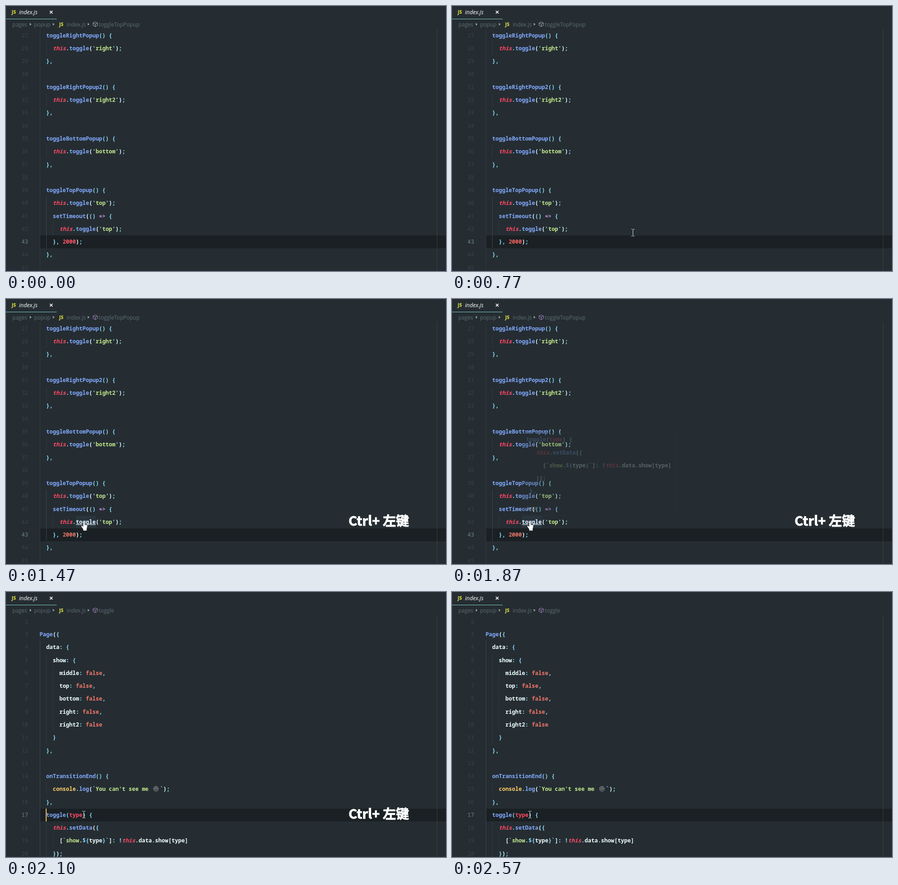
An HTML page that plays this animation: 964 by 581 pixels, repeating every 2880 ms.

```html
<!DOCTYPE html>
<html lang="en">
<head>
<meta charset="utf-8">
<title>Go to definition</title>
<style>
  html, body { margin: 0; width: 100%; height: 100%; overflow: hidden; background: #252d32; }
  svg { display: block; width: 964px; height: 581px; }
  text { white-space: pre; }
  .code { font: 600 12.06px "Noto Sans Mono", monospace; }
  .ui { font: 11.8px "Open Sans", sans-serif; fill: #5b6c73; }
  .js { font: 800 10px "Open Sans", sans-serif; fill: #cbcb41; }
  .tab { font: italic 500 12.3px "Open Sans", sans-serif; fill: #fff; }
  .keys { font: 900 28.8px "Noto Sans CJK SC", "Noto Sans CJK", sans-serif; fill: #fff; stroke: #fff; stroke-width: .9; }
  .num { fill: #374349; font-weight: 400; text-anchor: end; }
  .num.on { fill: #6c7f88; }
  .b { fill: #82aaff; }
  .c, .e { fill: #89ddff; }
  .g { fill: #c3e88d; }
  .n { fill: #f3776a; }
  .p { fill: #c792ea; }
  .r { fill: #ff4965; }
  .t { fill: #ff4965; font-style: italic; }
  .w { fill: #eeffff; }
  .y { fill: #ffcb6b; }
  .guide { fill: #2f3a3f; }
  .guide.on { fill: #3a464c; }
  .link { fill: #dce8ec; text-decoration: underline; }
</style>
</head>
<body>
<svg viewBox="0 0 964 581">
  <rect width="964" height="581" fill="#252d32"/>

  <text class="js" x="12.500" y="17">JS</text>
  <text class="tab" x="28.5" y="18">index.js</text>
  <path d="M96 10.500l6 6m0-6l-6 6" stroke="#fff" stroke-width="1.7"/>
  <rect y="28" width="111" height="1" fill="#80cbc4"/>

  <g class="ui">
    <text x="14" y="44.5">pages</text>
    <text x="61.5" y="44.5">popup</text>
    <text x="133" y="44.5">index.js</text>
    <text x="203" y="44.5" data-show="0-2100">toggleTopPopup</text>
    <text x="203" y="44.5" data-show="2100-2880">toggle</text>
  </g>
  <text class="js" x="116.500" y="43.5">JS</text>
  <path d="M52 37l4 3-4 3zM102.500 37l4 3-4 3zM179 37l4 3-4 3z" fill="#91a0a6"/>
  <path id="cube" d="M195.500 35l4.800 2.300v5.200l-4.800 2.800-4.800-2.800v-5.200zM190.700 37.300l4.800 2.400 4.800-2.400M195.500 39.700v5.600" fill="none"/>

  <g id="before" class="code" data-show="0-2100"></g>
  <g id="after" class="code" data-show="2100-2880"></g>
  <rect x="944" y="50" width="1" height="531" fill="#364146"/>

  <g id="link" class="code" data-show="1400-2100"></g>
  <g id="hover" class="code" data-show="1870-2020">
    <rect x="154.500" y="291.500" width="336" height="182" fill="#252d32" stroke="#303b40"/>
  </g>

  <rect x="167" y="475" width="2" height="28" fill="#ffcc00" data-show="2020-2100"/>
  <rect x="87" y="475" width="2" height="28" fill="#f5b85c" data-show="2100-2570"/>
  <circle cx="167.500" cy="487.500" r="11" fill="#bdbb1c" fill-opacity=".75" data-show="2020-2100"/>

  <text class="keys" x="750.500" y="497" data-show="1230-2250">Ctrl+ 左键</text>

  <path id="beam" d="M-3.500-7.500h2.500l1 1 1-1h2.500M0-6.500v13M-3.500 7.500h2.500l1-1 1 1h2.500" fill="none" stroke="#dfe3e4"/>
  <path d="M169 488.500c0-2 3-2 3 0v6l4 1c2 .5 2.500 1.500 2.200 3.500l-1.200 5v4h-8v-3l-4-6c-1-2 1-3 2.500-1.500l1.500 1.500z"
        fill="#fff" stroke="#1a2023" stroke-width=".6" data-show="1470-2020"/>
</svg>

<script>
const LOOP = 2880, LEFT = 73.5, TOP = 50.4, ROW = 28.26, CHAR = 7.236;
const $ = id => document.getElementById(id);
const rowTop = i => TOP + i * ROW;
const baseline = i => Math.round(rowTop(i) + 18.5);

// Code markup: "~x" switches to colour class x; "~e" also leaves room for the emoji.
function codeText(line, left, y) {
  const body = line.trimStart();
  const x = left + (line.length - body.length) * CHAR;
  const spans = body.split('~').slice(1).map(s =>
    `<tspan class="${s[0]}"${s[0] === 'e' ? ' dx="18"' : ''}>${s.slice(1).replace('>', '&gt;')}</tspan>`);
  return `<text x="${x}" y="${y}">${spans.join('')}</text>`;
}

function guide(col, from, to, show) {
  const rect = cls => `class="guide ${cls}" x="${Math.round(LEFT + col * CHAR)}" y="${rowTop(from)}" width="1" height="${(to - from) * ROW}"/>`;
  return `<rect ${rect('')}` + (show ? `<rect data-show="${show}" ${rect('on')}` : '');
}

function activeRow(i, number, show) {
  return `<g data-show="${show}"><rect x="75" y="${Math.ceil(rowTop(i))}" width="889" height="28" fill="#1a2023"/>
    <text class="num on" x="48.5" y="${baseline(i)}">${number}</text></g>`;
}

function scene(id, first, lines, active, guides) {
  const numbers = lines.map((_, i) => `<text class="num" x="48.5" y="${baseline(i)}">${first + i}</text>`);
  const code = lines.map((line, i) => line && codeText(line, LEFT, baseline(i)));
  $(id).innerHTML = [...numbers, ...active, ...guides.map(g => guide(...g)), ...code].join('');
}

const method = name => `  ~b${name}~c() {`;
const call = (arg, indent = 4) => ' '.repeat(indent) + `~tthis~c.~btoggle~w(~c'~g${arg}~c'~w)~c;`;
const flag = (name, end = ',') => `      ~w${name}~c: ~nfalse~c${end}`;
const popup = (name, arg) => [method(name), call(arg), '  ~c},', ''];
const toggleBody = [
  '  ~btoggle~c(~rtype~c) {',
  '    ~tthis~c.~bsetData~w(~c{',
  '      ~w[~c`~gshow.~c${~wtype~c}`~w]~c: !~tthis~c.~wdata~c.~wshow[type]',
  '    ~c}~w)~c;'
];

scene('before', 27, [
  ...popup('toggleRightPopup', 'right'),
  ...popup('toggleRightPopup2', 'right2'),
  ...popup('toggleBottomPopup', 'bottom'),
  method('toggleTopPopup'), call('top'),
  '    ~bsetTimeout~w(~c() ~p=>~c {', call('top', 6), '    ~c}, ~n2000~w)~c;', '  ~c},', ''
], [activeRow(16, 43, '0-2020'), activeRow(15, 42, '2020-2100')],
[[0, 0, 19], [2, 1, 2], [2, 5, 6], [2, 9, 10], [2, 13, 17, '0-2020'], [4, 15, 16, '2020-2100']]);

scene('after', 2, [
  '', '~bPage~w(~c{', '  ~wdata~c: {', '    ~wshow~c: {',
  flag('middle'), flag('top'), flag('bottom'), flag('right'), flag('right2', ''),
  '    ~c}', '  ~c},', '',
  method('onTransitionEnd'), "    ~yconsole~c.~blog~w(~c`~gYou can't see me ~e`~w)~c;", '  ~c},',
  ...toggleBody
], [activeRow(15, 17, '2100-2880')],
[[0, 2, 19, '2100-2880'], [2, 3, 10], [2, 13, 14], [2, 16, 19], [4, 4, 9], [4, 17, 18]]);

$('after').insertAdjacentHTML('beforeend',
  `<circle cx="328.5" cy="431.5" r="5.9" fill="#666e71"/>
   <path d="M325 429.500h2.500m2 0h2.500M325 433q3.500 3.500 7 0" fill="none" stroke="#22292d" stroke-width="1.500"/>`);

$('link').innerHTML =
  `<rect x="153" y="475" width="44" height="27" fill="#82aaff" fill-opacity=".05"/>
   <text class="link" x="${LEFT + 11 * CHAR}" y="${baseline(15)}">toggle</text>`;

const preview = toggleBody.map((line, i) => i ? line.slice(1) : line.trimStart()).concat(' ~c},');
$('hover').insertAdjacentHTML('beforeend',
  preview.map((line, i) => codeText(line, 162.5, Math.round(312.3 + i * ROW))).join('') +
  codeText('~wany', 162.5, 463));

const ranged = [...document.querySelectorAll('[data-show]')].map(el => {
  const [from, to] = el.dataset.show.split('-').map(Number);
  return { el, from, to };
});
const delay = document.querySelector('#before .n');
const ticks = [150, 230, 300, 380, 450, 530, 620, 700, 780, 850, 930, 1000, 1080, 1160];

// The pointer sweeps left at an even pace, then slows down onto the word.
function pointer(t) {
  if (t >= 2020) return [170.5, 488];
  const k = ticks.filter(tick => tick <= t).length - 1;
  if (k <= 6) return [830 - 61.8 * k, 500 + 71 * (1 - k / 6) ** 2];
  const rest = (1 - (k - 6) / 7) ** 1.6;
  return [171 + 288 * rest, 484 + 16 * rest];
}

function draw(t) {
  for (const { el, from, to } of ranged) el.style.display = t >= from && t < to ? '' : 'none';
  const [x, y] = pointer(t);
  const beam = $('beam');
  beam.style.display = t < 150 || (t >= 1470 && t < 2020) ? 'none' : '';
  beam.setAttribute('transform', `translate(${Math.floor(x) + .5} ${Math.round(y)})`);
  $('hover').style.opacity = t < 1960 ? .24 : 1;
  $('cube').style.stroke = t < 1230 ? '#a3adb2' : '#a386bd';
  delay.style.fill = t < 700 ? '#fb5567' : t < 1230 ? '#f5655f' : '#e8766a';
}

const start = performance.now();
function frame() {
  draw((performance.now() - start) % LOOP);
  requestAnimationFrame(frame);
}
frame();
</script>
</body>
</html>
```
